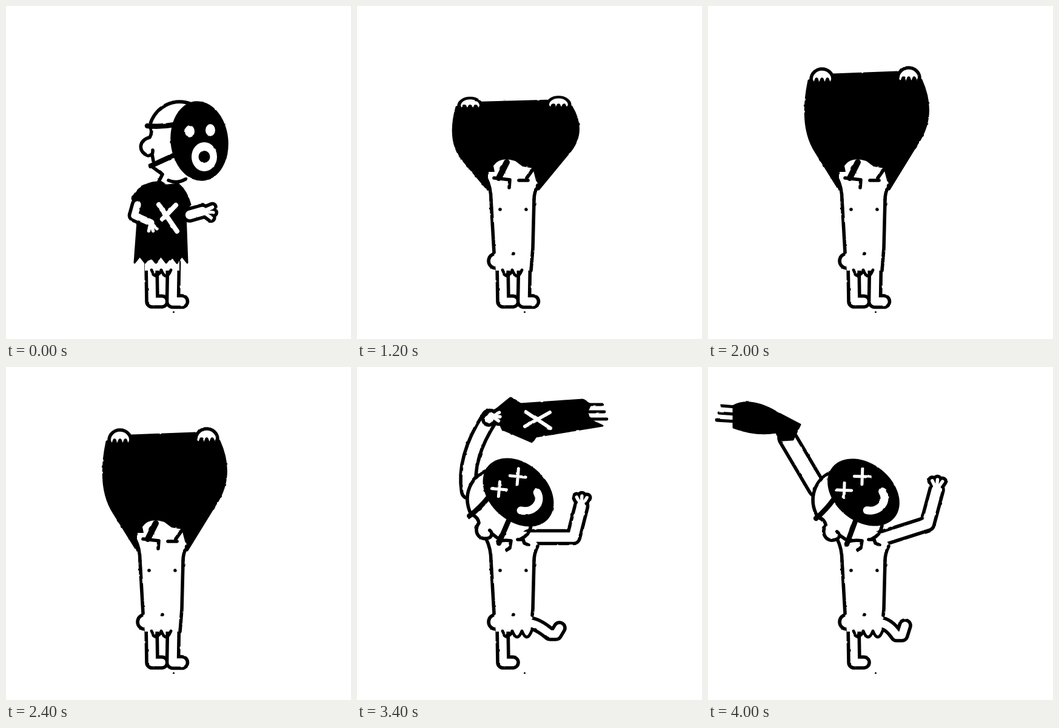
Write an HTML page that moves like this. It is 569 px wide and 550 px high and loops after 4.2 s.

```html
<!DOCTYPE html>
<html lang="en">
<head>
<meta charset="utf-8">
<title>Masked dancer</title>
<style>
html, body { margin: 0; width: 100%; height: 100%; overflow: hidden; background: #fff; }
svg { display: block; width: 100vw; height: 100vh; }
</style>
</head>
<body>
<svg id="stage" viewBox="0 0 569 550">
  <filter id="ink" filterUnits="userSpaceOnUse" x="0" y="0" width="569" height="550" color-interpolation-filters="sRGB">
    <feTurbulence type="fractalNoise" baseFrequency=".1" numOctaves="1" seed="4"/>
    <feDisplacementMap in="SourceGraphic" scale="2.500" xChannelSelector="R" yChannelSelector="G"/>
  </filter>
  <g id="drawing" filter="url(#ink)" stroke-linecap="round" stroke-linejoin="round"></g>
  <circle cx="276.500" cy="505.500" r="1.500"/>
</svg>
<script>
const INK = 5.6;
const line = (d, w = INK, color = '#000') =>
  `<path d="${d}" fill="none" stroke="${color}" stroke-width="${w}"/>`;
const fill = (d, color = '#fff') => `<path d="${d}" fill="${color}"/>`;
const cloth = d => `<path d="${d}" stroke="#000" stroke-width="3"/>`;
const outlined = d => `<path d="${d}" fill="#fff" stroke="#000" stroke-width="${INK}"/>`;
const oval = (x, y, rx, ry, color = '#000', turn = 0) =>
  `<ellipse cx="${x}" cy="${y}" rx="${rx}" ry="${ry}" fill="${color}" transform="rotate(${turn} ${x} ${y})"/>`;
const dot = (x, y) => oval(x, y, 2.8, 2.8);
const group = (t, ...parts) => `<g transform="${t}">${parts.join('')}</g>`;
const place = (x, y, turn, ...parts) => group(`translate(${x} ${y}) rotate(${turn})`, ...parts);

// Outlined union of strokes; each is [path, distance between its two outlines].
const tube = strokes =>
  strokes.map(([d, w]) => line(d, w + INK)).join('') +
  strokes.map(([d, w]) => line(d, w - INK, '#fff')).join('');

// Three fingers fanned around the palm.
function fingers(x, y, turn, length) {
  return [-30, 0, 30].map(fan => {
    const a = (turn + fan) * Math.PI / 180;
    return [`M${x} ${y}L${x + length * Math.sin(a)} ${y - length * Math.cos(a)}`, 11];
  });
}
const arm = (d, w, x, y, turn, length) =>
  tube([[`${d}L${x} ${y}`, w], ...fingers(x, y, turn, length)]);
const fist = (x, y) => place(x, y, 0,
  outlined('M18 3A18 17 0 0 0 -18 3' + 'q4.500 15 9 0'.repeat(4) + 'Z'));

function zigzag(x1, x2, y, teeth, depth) {
  let d = '';
  for (let i = 0; i <= teeth * 2; i++)
    d += `L${x1 + (x2 - x1) * i / (teeth * 2)} ${y - (i % 2) * depth}`;
  return d;
}

// Head, in coordinates around the centre of the mask.
const eyes = oval(-16, -16, 8, 10, '#fff') + oval(18, -18, 8, 10, '#fff');
const openFace = eyes + oval(8, 26, 21, 24, '#fff') + oval(8, 26, 9.5, 10);
const cross = (size, w) => line(`M${-size} 0H${size}M0 ${-size}V${size}`, w, '#fff');
const happyFace = place(-20, -25, 47, cross(12, 5)) + place(17, -20, 47, cross(13, 5)) +
  line('M23 21C19 40 -5 42 -17 25', 13, '#fff');
const head = (x, y, turn, face) => place(x, y, turn,
  fill('M-82 -26C-72 -58 -42 -72 -13 -61L-43 24H-85Z'),
  line('M-82 -26C-72 -58 -42 -72 -13 -61'),
  line('M-81 -23Q-77 -14 -82 -6C-100 -2 -102 18 -85 24Q-76 24 -77 15M-78 22L-76 33'),
  line('M-86 -25Q-64 -23 -41 -27M-80 41L-43 24', 8.5),
  oval(0, 0, 47.5, 66, '#000', -6), face);

const upright = (dx, dy) => head(319 + dx, 223 + dy, 0, openFace) +
  place(dx, dy, 0, line('M243 267L258 278L252 290L262 296M268 288Q282 294 296 286'));
const collar = line('M232 288Q243 285 254 287L252 299L247 302M265 285H274L276 291L283 294');
const tilted = (x, turn, face) =>
  line('M287 262Q284 278 270 284') + collar + head(x, 207, turn, face);

// Body
const scallops = n => line('M240 436' + 'q8 20 16 0'.repeat(n), 4.8);
const leftLeg = tube([['M240 425L241 488H257', 18]]);
const rightLeg = tube([['M276 425L275 488H290', 19]]);
const bulge = tube([['M229 421h.1', 24]]);
const trunk = end =>
  fill('M214 284Q222 310 222 345L226 407L229 437H286L290 400L291 345Q292 310 299 294L284 272H250Z') +
  line(`M221 320L226 407M292 320L290 400L${end}`) + dot(258, 409);
const flare = line('M213 284Q221 300 221 320M298 296Q292 308 292 320') + dot(236, 336) + dot(279, 336);
const legs = bulge + leftLeg + rightLeg;
const standing = legs + trunk('287 437') + scallops(2);
const bare = standing + flare;

const shirt = (left, right, hemLeft, hemRight, hem) => cloth(
  `M258 297L248 291Q220 294 ${left} ${left + 110}L${left + 10} 342` +
  zigzag(hemLeft, hemRight, hem, 5, 11) +
  `L296 342L${right} 328Q${right - 6} 306 284 294Z`);
const badge = (x, y, stretch) => group(`translate(${x} ${y}) scale(1 ${stretch})`,
  line('M-15 -19L15 25M13 -18L-9 5', 8, '#fff'));

const start = leftLeg + rightLeg + fill('M229 420H286V437H229Z') + scallops(2) +
  shirt(208, 304, 212, 299, 424) +
  arm('M217 328L212 346', 17, 239, 358, 165, 14) +
  arm('M303 345', 20, 324, 339, 97, 18) +
  badge(267, 347, 1) + upright(0, 0);

// Both hands pull the hem up while the elbows spread.
const undress = (dx, dy, left, right, hem) => standing +
  shirt(left, right, 209, 294, hem) +
  arm(`M${left + 10} 310L${left + 11} 324`, 20, 237, hem - 25, 175, 12) +
  arm(`M${right - 5} 322L${right} 335`, 21, 305, hem - 12, 185, 12) +
  line(`M${left} 322h22M${right - 18} 335l24 -4`) +
  badge(268, 332, hem / 650) + upright(dx, dy);

// Shirt pulled inside out over the head, stretched from the waist.
const sack = (sx, sy) =>
  group(`translate(261 304) scale(${sx} ${sy}) translate(-261 -304)`,
    cloth('M166 123L207 113L312 109L352 122Q378 180 345 228L299 303H216L178 242Q150 200 166 123Z'),
    fist(188, 118), fist(331, 116)) +
  fill('M216 296V274H227L225 264Q236 248 261 256L273 265L290 268L297 296Z') +
  bare +
  line('M247 258L234 284', 10) + line('M226 284L252 287L251 300M290 270L280 284M267 288H282');

const holdUp = (x1, y1, x2, y2) =>
  tube([[`M${x1 - 2} ${y1 + 20}L184 212`, 21]]) +
  tube([[`M${x2 - 8} ${y2 + 25}L${x2 - 22} ${y2 + 84}L292 282`, 25]]) +
  bare + tilted(265, -42, openFace) +
  `<path d="M${x1 + 3} ${y1 + 9}L${x2 + 13} ${y2 + 23}" stroke="#000" stroke-width="34" stroke-linecap="butt"/>` +
  fist(x1, y1) + fist(x2, y2);

const kick = leg => bulge + leftLeg + tube([[leg, 18]]) + trunk('289 410') + flare + scallops(3);
const fringe = (x, y, dx, dy) =>
  [0, 1, 2].map(i => line(`M${x} ${y + i * 12}l${dx + i * Math.sign(dx) * 4} ${dy}`, 4.8)).join('');

const waveRight =
  tube([['M219 84Q176 150 185 205', 25]]) +
  arm('M284 281L357 281', 21, 370, 230, 3, 17) +
  kick('M284 423Q298 424 318 441L328 441L334 431') + tilted(266, -42, happyFace) +
  cloth('M226 73L253 51L270 61L372 54L385 62L379 75L386 88L405 97L295 115L289 124L240 103Z') +
  fringe(375, 62, 29, 0) + place(298, 87, 0, line('M-20 -13L21 14M20 -12L-21 11', 6, '#fff')) +
  tube([...fingers(222, 81, 95, 14), ['M217 87L222 81', 18]]);

const waveLeft =
  tube([['M131 117L180 200', 28]]) +
  arm('M284 284L362 259', 22, 377, 203, 5, 17) +
  kick('M284 423Q298 424 311 443L320 443L325 427') + tilted(256.5, -45, happyFace) +
  cloth('M42 64Q70 50 112 74L152 95L140 120L122 121L112 108Q80 114 42 100Z') +
  fringe(46, 66, -24, -2);

const high = sack(1, 1), low = sack(1.07, .76);
const poses = [
  start,
  undress(25, 10, 212, 314, 415), undress(15, 11, 208, 322, 400),
  undress(4, 6, 205, 335, 376), undress(0, 1, 193, 358, 344),
  sack(.96, .75), sack(1.02, .76),
  low, high, low, high, low, high,
  sack(.97, 1.15),
  holdUp(183, 88, 343, 88), holdUp(163, 88, 387, 138),
  waveLeft, waveRight, waveLeft, waveRight, waveLeft
];

const step = 200;
const drawing = document.getElementById('drawing');
const began = performance.now();
let shown = -1;
function tick() {
  const i = Math.floor((performance.now() - began) / step) % poses.length;
  if (i !== shown) drawing.innerHTML = poses[shown = i];
  requestAnimationFrame(tick);
}
tick();
</script>
</body>
</html>
```
